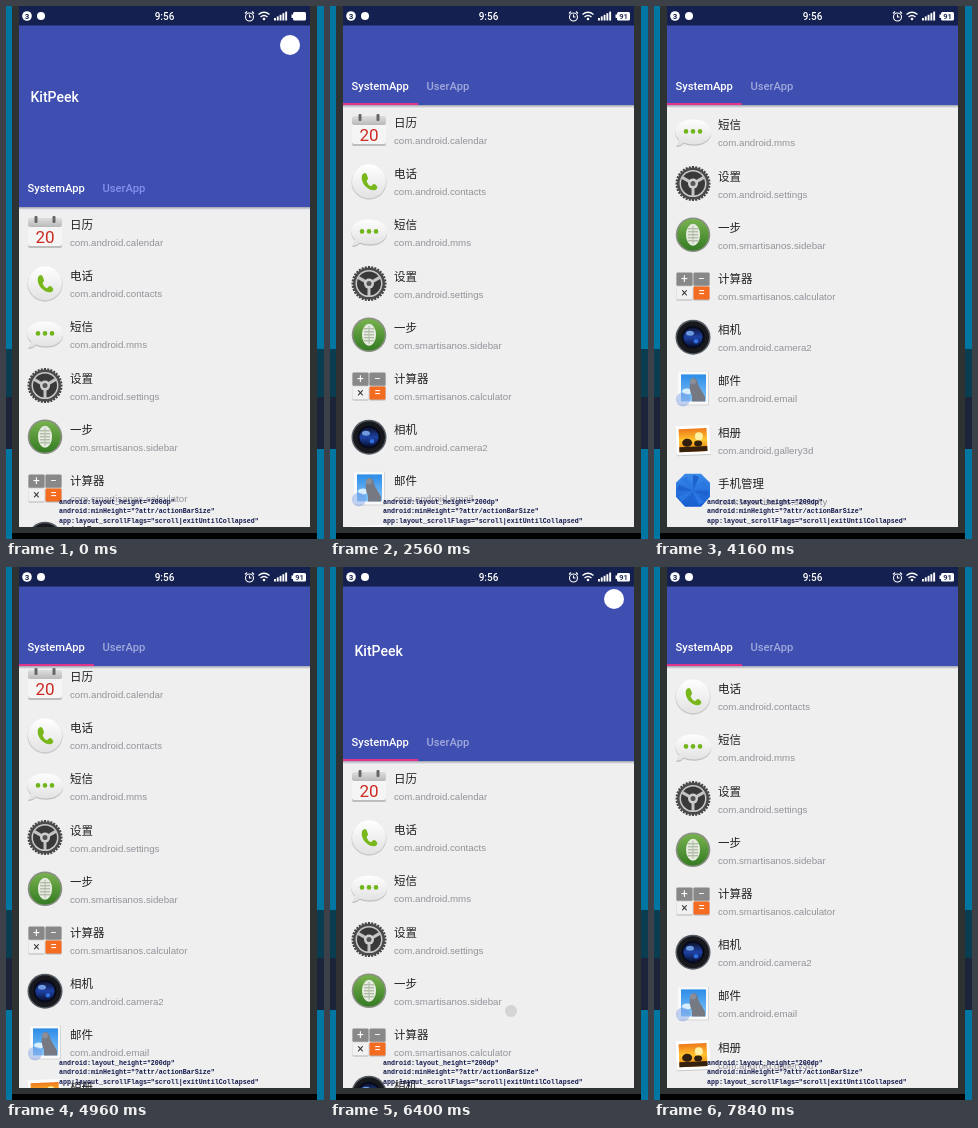
An HTML page with a canvas that plays this animation: 318 px wide and 533 px high, repeating every 8 s.

```html
<!DOCTYPE html>
<html lang="zh-CN">
<head>
<meta charset="utf-8">
<style>
  html, body { margin: 0; width: 100%; height: 100%; overflow: hidden; }
  canvas { display: block; width: 318px; height: 533px; }
</style>
</head>
<body>
<canvas></canvas>
<script>
const LOOP = 8000, STEP = 160, ROW = 51.2, OPEN = 201, RANGE = 102;
const canvas = document.querySelector('canvas');
const c = canvas.getContext('2d');
const dpr = window.devicePixelRatio || 1;
canvas.width = 318 * dpr;
canvas.height = 533 * dpr;

// [time, scroll distance]; the header folds first, then the list moves
const scrollKeys = [
  [0, 0], [1280, 0], [1920, 24], [2560, 102], [3200, 151], [3680, 184], [4160, 202],
  [4640, 150], [4960, 109], [5600, 0], [6240, 0], [6400, 7], [6880, 102], [7840, 148], [8000, 148]
];

function scrollAt(t) {
  const i = scrollKeys.findIndex(k => k[0] > t);
  const [t0, a] = scrollKeys[i - 1], [t1, b] = scrollKeys[i];
  return a + (b - a) * (t - t0) / (t1 - t0);
}

function rect(x, y, w, h, fill, r = 0) {
  c.fillStyle = fill;
  c.beginPath();
  c.roundRect(x, y, w, h, r);
  c.fill();
}
function oval(x, y, rx, ry, fill) {
  c.fillStyle = fill;
  c.beginPath();
  c.ellipse(x, y, rx, ry, 0, 0, 7);
  c.fill();
}
const disc = (x, y, r, fill) => oval(x, y, r, r, fill);
function shape(d, fill) {
  c.fillStyle = fill;
  c.fill(new Path2D(d));
}
function stroke(d, color, width) {
  c.strokeStyle = color;
  c.lineWidth = width;
  c.stroke(new Path2D(d));
}
function text(s, x, y, font, fill, align = 'left') {
  c.font = font;
  c.fillStyle = fill;
  c.textAlign = align;
  c.fillText(s, x, y);
}
function shade(y0, y1, ...colors) {
  const g = c.createLinearGradient(0, y0, 0, y1);
  colors.forEach((color, i) => g.addColorStop(i / (colors.length - 1), color));
  return g;
}

// Each icon is drawn around 0,0 within about 17 px
function calendar() {
  rect(-17, -13, 34, 29, '#bdbdbd', 2);
  rect(-17, -14, 34, 28, '#f5f5f5', 2);
  rect(-17, -14, 34, 9, shade(-14, -5, '#dedede', '#b9b9b9'), 2);
  for (const x of [-9, 9]) rect(x - 1.5, -16, 3, 7, '#666', 1);
  text('20', 0, 11, '17px Roboto, sans-serif', '#cc2b22', 'center');
}
function phone() {
  disc(0, 1, 17.5, '#c9c9c9');
  disc(0, 0, 17, shade(-17, 17, '#ffffff', '#e2e2e2'));
  shape('M-7-6C-5-9-3-9-2-6L-1-3C-1-1-3-1-2 1Q-1 4 2 5C3 5 4 2 6 3L8 5C9 7 7 9 5 9C-2 9-9 1-7-6', '#79b81c');
}
function message() {
  const bubble = 'M0-13C24-13 24 11 2 12C-3 12-7 11-9 10Q-13 14-17 13Q-14 10-14 7C-22-1-17-13 0-13';
  c.save();
  c.translate(0, 1.3);
  shape(bubble, '#bfbfbf');
  c.restore();
  shape(bubble, shade(-14, 13, '#ffffff', '#e1e1e1'));
  for (const x of [-7, 0, 7]) disc(x, -1, 2.3, '#72b51b');
}
function gear() {
  for (let i = 0; i < 32; i++) {
    c.save();
    c.rotate(i * Math.PI / 16);
    rect(-1, -17.5, 2, 4, '#444');
    c.restore();
  }
  disc(0, 0, 16, '#4a4a4a');
  disc(0, 0, 13.5, '#c8c8c8');
  disc(0, 0, 12, '#393939');
  for (let i = 0; i < 3; i++) {
    c.save();
    c.rotate(i * Math.PI * 2 / 3 + Math.PI);
    rect(-1.5, -13, 3, 13, '#c4c4c4');
    c.restore();
  }
  disc(0, 0, 5, '#cecece');
  disc(0, 0, 2.5, '#555');
}
function sidebar() {
  disc(0, 0, 17.3, '#8a8f84');
  disc(0, 0, 15.7, shade(-16, 16, '#78b24f', '#347b23'));
  oval(0, 0, 7, 11, '#e6ebdf');
  for (let y = -6; y < 9; y += 3) stroke(`M-5 ${y}H5`, '#9eac94', 1);
  stroke('M0-9V9', '#b0bca8', 1);
}
function calculator() {
  const keys = [['+', '#888'], ['−', '#888'], ['×', '#f1f1f1'], ['=', '#f46c20']];
  keys.forEach(([sign, fill], i) => {
    const x = i % 2 ? .5 : -16.5, y = i < 2 ? -13.5 : 0.5;
    rect(x, y + 1, 16, 13, '#b5b5b5', 1);
    rect(x, y, 16, 13, fill, 1);
    text(sign, x + 8, y + 10.5, '12px Roboto, sans-serif', i === 2 ? '#333' : '#fff', 'center');
  });
}
function camera() {
  disc(0, 0, 17.5, '#555b62');
  disc(0, 0, 16, '#17191d');
  disc(0, 0, 11.5, '#070b1b');
  disc(0, 0, 9.5, shade(-9, 9, '#101638', '#1e43a6', '#0a1237'));
  oval(-3, -4, 4, 2.5, '#6f9ae0');
  disc(3, 4, 2.3, '#2f6fe0');
}
function mail() {
  rect(-15, -17, 31, 34, '#d5d5d5', 1);
  rect(-15, -17, 30, 33, '#fafafa', 1);
  rect(-12, -14, 25, 27, shade(-14, 13, '#2b8ce8', '#87c5f5'));
  oval(-6, 3, 5, 3, '#d8efff');
  shape('M-2-9Q2-12 4-8L6-2 12 8V13H-1V7Q-5 0-2-9', '#777982');
  disc(0, -7, 3, '#8b8e99');
  disc(-10, 11, 7, 'rgba(105,145,225,.4)');
}
function gallery() {
  c.save();
  c.rotate(-.04);
  rect(-17, -13, 34, 29, '#c9c9c9');
  rect(-17, -14, 34, 29, '#fff');
  rect(-14, -11, 28, 23, shade(-11, 12, '#ee781b', '#ffc52d', '#e77b10'));
  disc(6, -3, 4, '#fff1a3');
  rect(-14, 7, 28, 5, '#36200e');
  oval(-6, 3, 5, 4, '#30200f');
  oval(5, 4, 4, 3, '#30200f');
  c.restore();
}
function security() {
  const octagon = 'M-8-17H8L17-8V6L8 16H-8L-17 6V-8Z';
  shape(octagon, shade(-17, 16, '#3a8bea', '#145bd0'));
  for (let i = 0; i < 8; i++) {
    c.save();
    c.rotate(i * Math.PI / 4);
    shape('M0 0L0-16 6-14Z', i % 2 ? '#2b78e2' : '#1d62cf');
    c.restore();
  }
}

const apps = [
  ['日历', 'com.android.calendar', calendar],
  ['电话', 'com.android.contacts', phone],
  ['短信', 'com.android.mms', message],
  ['设置', 'com.android.settings', gear],
  ['一步', 'com.smartisanos.sidebar', sidebar],
  ['计算器', 'com.smartisanos.calculator', calculator],
  ['相机', 'com.android.camera2', camera],
  ['邮件', 'com.android.email', mail],
  ['相册', 'com.android.gallery3d', gallery],
  ['手机管理', 'com.smartisanos.security', security]
];
const codeLines = [
  'android:layout_height="200dp"',
  'android:minHeight="?attr/actionBarSize"',
  'app:layout_scrollFlags="scroll|exitUntilCollapsed"'
];

function drawFrame() {
  rect(0, 0, 318, 533, '#0077a3');
  rect(0, 343, 318, 48, '#0b3d50');
  rect(0, 391, 318, 52, '#1b2439');
  rect(6, 0, 305, 533, '#2e3232');
  rect(6, 527, 305, 6, '#030303');
  rect(13, 0, 291, 521, '#efefef');
}

function drawList(top) {
  apps.forEach(([name, id, icon], i) => {
    const y = top + i * ROW;
    c.save();
    c.translate(39, y + 25);
    icon();
    c.restore();
    text(name, 64, y + 22, '500 11.5px "Noto Sans CJK SC", "Noto Sans CJK", sans-serif', '#222');
    text(id, 64, y + 39, '9.7px "Liberation Sans", Arial, sans-serif', '#92929a');
  });
}

function drawHeader(bottom, t) {
  rect(13, bottom, 291, 3, shade(bottom, bottom + 3, 'rgba(60,65,100,.45)', 'rgba(60,65,100,0)'));
  rect(13, 19, 291, bottom - 19, '#3f4fb1');
  disc(284, bottom - 162, 10, '#fff');
  text('KitPeek', 24.5, bottom - 105, '500 14px Roboto, sans-serif', '#fff');
  text('SystemApp', 21.5, bottom - 15, '500 11.2px Roboto, sans-serif', '#fff');
  text('UserApp', 96.5, bottom - 15, '500 11.2px Roboto, sans-serif', t < 960 ? '#8490f0' : '#a0a8db');
  if (t >= 2080) rect(13, bottom - 2, 75, 2, '#e0358a');
}

function drawStatus(t) {
  rect(13, 0, 291, 19.5, '#14204f');
  disc(21, 10, 4.8, '#fff');
  text('3', 21, 13, 'bold 8px Roboto, sans-serif', '#14204f', 'center');
  disc(35, 10, 4, '#fff');
  text('9:56', 158.5, 14, '500 10px Roboto, sans-serif', '#fff', 'center');
  stroke('M239.5 11a4 4 0 1 0 8 0a4 4 0 1 0-8 0M243.5 8.5V11H245.5M239 7.5L241 5.5M248 7.5L246 5.5', '#fff', 1.1);
  stroke('M252.5 8.5Q258-.0 263.5 8.5'.replace('-.0', ' 4') + 'M254.5 11Q258 8 261.5 11', '#fff', 1.3);
  disc(258, 13, 1.3, '#fff');
  for (let i = 0; i < 5; i++) rect(268 + i * 2.8, 12 - i * 1.6, 1.9, 2.5 + i * 1.6, '#fff');
  rect(287, 6, 13, 8.5, '#fff', 1.5);
  rect(285.5, 8.5, 2, 3.5, '#fff');
  if (t >= 2400) text('91', 293.5, 13, 'bold 7.5px Roboto, sans-serif', '#26315f', 'center');
}

function draw(t) {
  const scroll = scrollAt(t);
  const bottom = OPEN - Math.min(scroll, RANGE);
  c.setTransform(dpr, 0, 0, dpr, 0, 0);
  drawFrame();
  c.save();
  c.beginPath();
  c.rect(13, 0, 291, 521);
  c.clip();
  drawList(bottom - Math.max(0, scroll - RANGE));
  drawHeader(bottom, t);
  drawStatus(t);
  if (t >= 6240 && t < 6720) disc(181, 451 - scroll, 6, 'rgba(150,150,150,.3)');
  c.restore();
  codeLines.forEach((line, i) =>
    text(line, 53, 498.3 + i * 9.1, 'bold 6.67px "Liberation Mono", monospace', '#10174a'));
}

const start = performance.now();
function tick() {
  const t = (performance.now() - start) % LOOP;
  draw(Math.floor(t / STEP) * STEP);
  requestAnimationFrame(tick);
}
tick();
</script>
</body>
</html>
```
